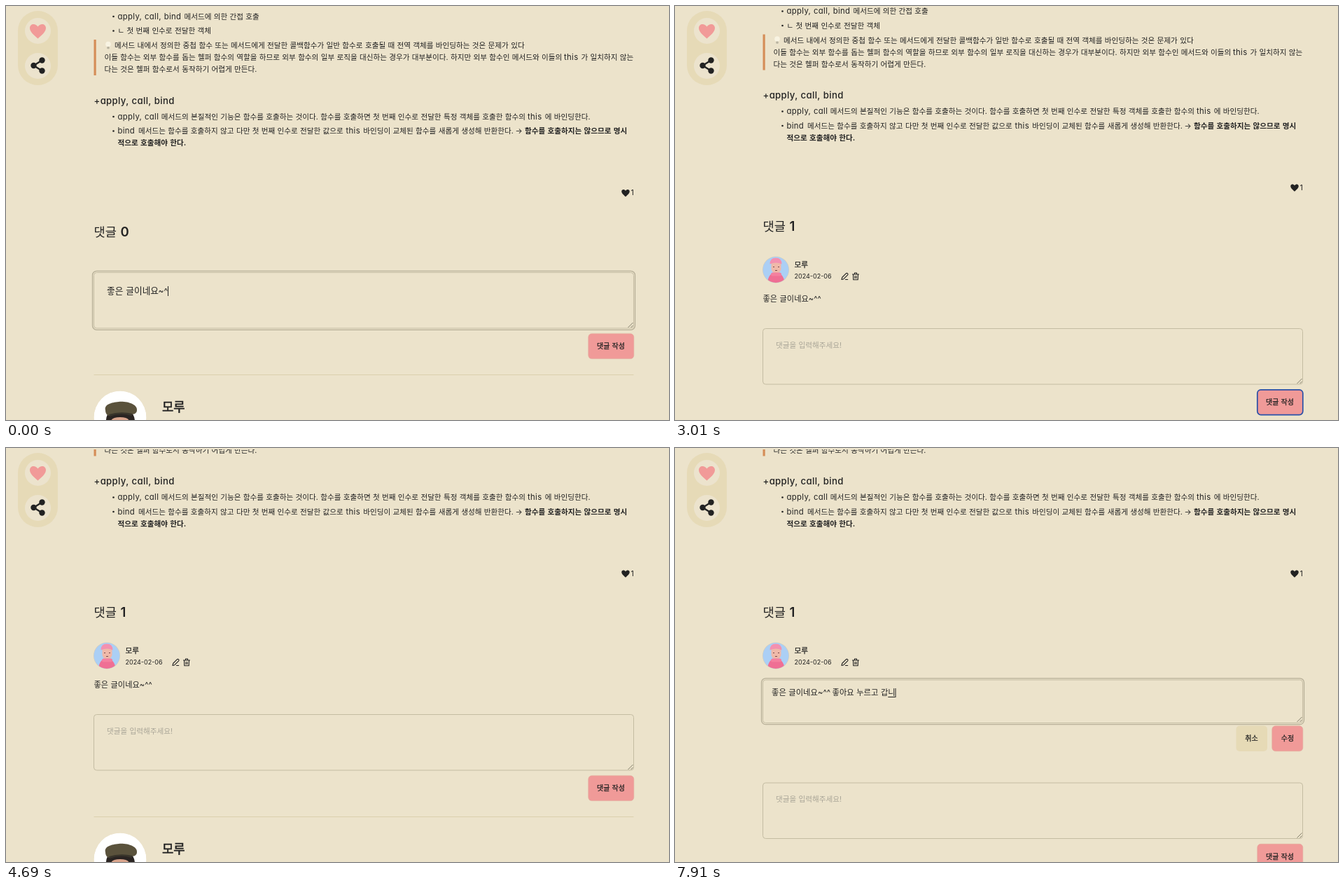
An HTML page that plays this animation: 947 by 591 pixels, repeating every 8000 ms.

```html
<!DOCTYPE html>
<html lang="ko">
<head>
<meta charset="utf-8">
<title>댓글</title>
<style>
html, body { margin: 0; width: 100%; height: 100%; overflow: hidden; background: #ece3cb; }
svg { display: block; width: 947px; height: 591px; }
text {
  font: 10.6px Inter, "Noto Sans CJK KR", "Noto Sans CJK", sans-serif;
  font-feature-settings: "cv11"; word-spacing: .03em; white-space: pre; fill: #222;
}
.latin { font-size: 11.3px; letter-spacing: .03em; }
.bold { font-weight: 700; word-spacing: .07em; }
.medium { stroke: #222; stroke-width: .25; }
.h3 { font-size: 13.2px; font-weight: 500; letter-spacing: .025em; }
.h2 { font-size: 17.6px; }
.count { font-size: 18.6px; font-weight: 600; }
.name { font-size: 17.8px; stroke: #222; stroke-width: .6; }
.date { font-size: 9px; }
.body { font-size: 11.2px; }
.edit { font-size: 11.3px; }
.draft { font-size: 12.7px; }
.smile { font-size: 12px; }
.hint { fill: #aaa698; }
.button { font-size: 10px; text-anchor: middle; stroke: #222; stroke-width: .25; }
.pink { fill: #f09a98; stroke: #e3a89b; stroke-width: .6; }
.pink.focused { stroke: #2950a8; stroke-width: 1.7; }
.box { fill: none; stroke: #c4bca2; }
.ring { fill: none; stroke: #b7af97; stroke-width: 1.3; }
.caret { stroke: #222; }
.icon { fill: none; stroke: #222; stroke-width: 1.1; stroke-linejoin: round; stroke-linecap: round; }
.grip { fill: none; stroke: #77735f; stroke-width: .9; }
</style>
</head>
<body>
<svg viewBox="0 0 947 591">
  <defs>
    <path id="heart" d="M0 10.5C-5 6-11.5 1-11.5-4.5C-11.5-11-3.5-12 0-6.5C3.5-12 11.5-11 11.5-4.5C11.5 1 5 6 0 10.5Z"/>
    <path id="grip" class="grip" d="M-7 0L0-7M-3 0L0-3"/>
    <clipPath id="face"><circle cx="144" cy="384" r="18.5"/></clipPath>
    <clipPath id="portrait"><circle cx="163" cy="587" r="37.5"/></clipPath>
  </defs>

  <g id="article">
    <g fill="#222">
      <circle cx="153.5" cy="15" r="1.3"/><circle cx="153.5" cy="35.5" r="1.3"/>
      <circle cx="153.5" cy="158" r="1.3"/><circle cx="153.5" cy="178.5" r="1.3"/>
    </g>
    <text x="159.5" y="18.5"><tspan class="latin">apply, call, bind</tspan><tspan x="254.5">메서드에 의한 간접 호출</tspan></text>
    <text x="159.5" y="39">ㄴ 첫 번째 인수로 전달한 객체</text>
    <rect x="125.5" y="48" width="3.2" height="51" fill="#d58d58"/>
    <circle cx="146" cy="54.5" r="3.8" fill="#f8f3e2"/>
    <rect x="144.3" y="58" width="3.4" height="3.2" rx="1" fill="#b9b3a0"/>
    <text x="155" y="60">메서드 내에서 정의한 중첩 함수 또는 메서드에게 전달한 콜백함수가 일반 함수로 호출될 때 전역 객체를 바인딩하는 것은 문제가 있다</text>
    <text x="140.5" y="77">이들 함수는 외부 함수를 돕는 헬퍼 함수의 역할을 하므로 외부 함수의 일부 로직을 대신하는 경우가 대부분이다. 하지만 외부 함수인 메서드와 이들의 <tspan x="797" class="latin">this</tspan><tspan x="821.5">가 일치하지 않는</tspan></text>
    <text x="140.5" y="94">다는 것은 헬퍼 함수로서 동작하기 어렵게 만든다.</text>

    <text x="125.5" y="139.5" class="h3">+apply, call, bind</text>
    <text x="159.5" y="161.5"><tspan class="latin">apply, call</tspan><tspan x="221.7">메서드의 본질적인 기능은 함수를 호출하는 것이다. 함수를 호출하면 첫 번째 인수로 전달한 특정 객체를 호출한 함수의 </tspan><tspan x="745" class="latin">this</tspan><tspan x="769.7">에 바인딩한다.</tspan></text>
    <text x="159.5" y="182"><tspan class="latin">bind</tspan><tspan x="189">메서드는 함수를 호출하지 않고 다만 첫 번째 인수로 전달한 값으로 </tspan><tspan x="485.5" class="latin">this</tspan><tspan x="510.3">바인딩이 교체된 함수를 새롭게 생성해 반환한다.</tspan><tspan x="727.5">→</tspan><tspan x="741" class="bold">함수를 호출하지는 않으므로 명시</tspan></text>
    <text x="159.5" y="199" class="bold">적으로 호출해야 한다.</text>

    <use href="#heart" transform="translate(885 267) scale(.5)" fill="#222"/>
    <text x="892.5" y="270">1</text>
    <text x="125.5" y="328.5" class="h2">댓글 <tspan id="count" x="163.5" class="count">0</tspan></text>

    <g id="comment">
      <circle cx="144" cy="384" r="19" fill="#d8cdb4"/>
      <g clip-path="url(#face)">
        <rect x="125" y="365" width="38" height="38" fill="#abcff5"/>
        <path d="M132 404q1-16 12-16t13 16z" fill="#ef6f94"/>
        <rect x="137.5" y="370" width="14" height="19" rx="6.5" fill="#efb9a9"/>
        <path d="M135.5 376q0-9 8.5-9t8.5 9q-8-4-17 0z" fill="#f391b0"/>
        <rect x="137" y="388" width="15" height="5" rx="2.5" fill="#f4809f"/>
        <path d="M140 380h2m5 0h2m-6 5h3" stroke="#77484a" fill="none"/>
      </g>
      <text x="170.5" y="380" class="medium">모루</text>
      <text x="170.5" y="396.5" class="date">2024-02-06</text>
      <path class="icon" d="M238 398l.7-3 5.800-5.800q1-.8 2 .2t.2 2l-5.800 5.800zm5.500 0h3.200"/>
      <path class="icon" d="M253.500 390.500h9m-6 0v-2h3v2m-5 0l.3 7.700h6.400l.3-7.700m-4.500 2.500v3m2 -3v3"/>
      <text id="posted" x="125.5" y="429.5" class="body">좋은 글이네요~^^</text>
    </g>
  </g>

  <g id="editor">
    <rect class="box" x="125.5" y="331" width="771" height="61.500" rx="4"/>
    <rect class="ring" id="editRing" x="123.5" y="328.8" width="775" height="65.8" rx="6"/>
    <use href="#grip" x="895.5" y="391"/>
    <text x="138" y="353" class="edit">좋은 글이네요<tspan x="204">~^^</tspan></text>
    <text x="221" y="353" class="edit" id="tail"></text>
    <path id="editCaret" class="caret"/>
    <path id="underline" class="caret"/>
    <rect x="801.5" y="396.5" width="44.5" height="36.5" rx="5" fill="#e6dab6"/>
    <text x="823.5" y="418" class="button">취소</text>
    <rect class="pink" x="852.8" y="396.8" width="44" height="36" rx="5"/>
    <text x="875" y="418" class="button">수정</text>
  </g>

  <g id="bottom">
    <rect class="box" x="125.5" y="380.5" width="771" height="79.5" rx="4"/>
    <rect class="ring" id="ring" x="123.5" y="378.3" width="775" height="84" rx="6"/>
    <use href="#grip" x="895.5" y="459"/>
    <text x="144" y="411" class="draft" id="draft">좋은 글이네요<tspan x="217.5" id="smile" class="smile"></tspan></text>
    <path id="caret" class="caret"/>
    <text x="144" y="407.5" class="hint" id="hint">댓글을 입력해주세요!</text>
    <rect id="submit" class="pink" x="831.8" y="467.8" width="65" height="35.8" rx="5"/>
    <text x="864" y="489.3" class="button">댓글 작성</text>
    <path d="M125.5 526.5h771" stroke="#dbd0ad"/>
    <g clip-path="url(#portrait)">
      <circle cx="163" cy="587" r="37.5" fill="#fff"/>
      <path d="M143 593q-1-17 20-17t21 17v10h-41z" fill="#2a2422"/>
      <path d="M150 592q2-5 13-5t13 5v10h-26z" fill="#d9a48c"/>
      <path d="M142 577c-2-8 8-11 19-12c13-1 27 4 26 12c0 5-5 6-8 6c-12-3-20-2-31 2c-4 0-6-4-6-8z" fill="#5a523c"/>
      <path d="M147 583q16-5 34-1l-2 3q-16-5-31 1z" fill="#38342a"/>
    </g>
    <text x="223" y="579" class="name">모루</text>
  </g>

  <rect x="113" width="784" height="2" fill="#ece3cb"/>
  <rect x="17" y="7" width="57" height="106" rx="28.5" fill="#e6dab7"/>
  <g fill="#ece3cd"><circle cx="45.5" cy="35.5" r="18.5"/><circle cx="45.5" cy="85.5" r="18.5"/></g>
  <use href="#heart" x="45.5" y="36" fill="#f19a98"/>
  <g fill="#222">
    <path d="M51.5 77.5L39.5 85L51.5 92.5" fill="none" stroke="#222" stroke-width="2.4"/>
    <circle cx="51.5" cy="77.5" r="4.2"/><circle cx="39.5" cy="85" r="4.2"/><circle cx="51.5" cy="92.5" r="4.2"/>
  </g>
</svg>

<script>
const LOOP = 8000, TICK = 70, ROW = 87.5, EDIT_ROW = 185;
const POST = 1470, BLUR = 1120, EDIT = 4830, FOCUS = 5320;
const $ = id => document.getElementById(id);
const show = (id, on) => $(id).style.display = on ? '' : 'none';
const move = (id, y) => $(id).setAttribute('transform', `translate(0 ${y})`);
const draw = (id, d) => $(id).setAttribute('d', d);

// Value of the last step at or before t
const at = (steps, t) => steps.reduce((v, [start, next]) => t >= start ? next : v, steps[0][1]);

const scroll = [
  [0, 0], [3010, 7.5], [3080, 17], [3150, 24], [3220, 28.5], [3290, 30],
  [3850, 41], [3920, 62], [3990, 81], [4060, ROW]
];
const typed = [
  [0, ''], [5600, ' '], [5740, ' ㅈ'], [5810, ' 조'], [5880, ' 좋'],
  [6020, ' 좋ㅇ'], [6090, ' 좋아'], [6230, ' 좋아ㅇ'], [6300, ' 좋아요'],
  [6440, ' 좋아요 '], [6510, ' 좋아요 ㄴ'], [6580, ' 좋아요 누'],
  [6720, ' 좋아요 눌'], [6790, ' 좋아요 누르'], [6860, ' 좋아요 누륵'],
  [6930, ' 좋아요 누르고'], [7000, ' 좋아요 누르고 '], [7070, ' 좋아요 누르고 ㄱ'],
  [7140, ' 좋아요 누르고 가'], [7700, ' 좋아요 누르고 갑'], [7910, ' 좋아요 누르고 갑니']
];

function render(ms) {
  const t = Math.floor(ms / TICK) * TICK;
  const posted = t >= POST, editing = t >= EDIT;
  const y = at(scroll, t);

  move('article', -y);
  move('bottom', (editing ? EDIT_ROW : posted ? ROW : 0) - y);
  $('count').textContent = posted ? 1 : 0;
  show('comment', posted);
  show('posted', !editing);
  show('editor', editing);
  show('draft', !posted);
  show('hint', posted);

  // New comment box
  $('smile').textContent = t < 70 ? '~^' : '~^^';
  $('ring').style.opacity = Math.min(1, Math.max(0, 1 - (t - BLUR + TICK) / 280));
  show('caret', t < 630);
  draw('caret', `M${t < 70 ? 231.5 : 238} 400v14`);
  $('submit').classList.toggle('focused', t >= BLUR && t < 4690);

  // Edit box
  const text = at(typed, t);
  const x = [...text].reduce((sum, c) => sum + (c === ' ' ? 3.5 : 10.4), 221);
  $('tail').textContent = text;
  show('editRing', t >= FOCUS);
  show('editCaret', t >= FOCUS);
  draw('editCaret', `M${x + .3} 343v13`);
  show('underline', text && !text.endsWith(' '));
  draw('underline', `M${x - 10.4} 355.5h10.4`);
}

const start = performance.now();
(function frame() {
  render((performance.now() - start) % LOOP);
  requestAnimationFrame(frame);
})();
</script>
</body>
</html>
```
